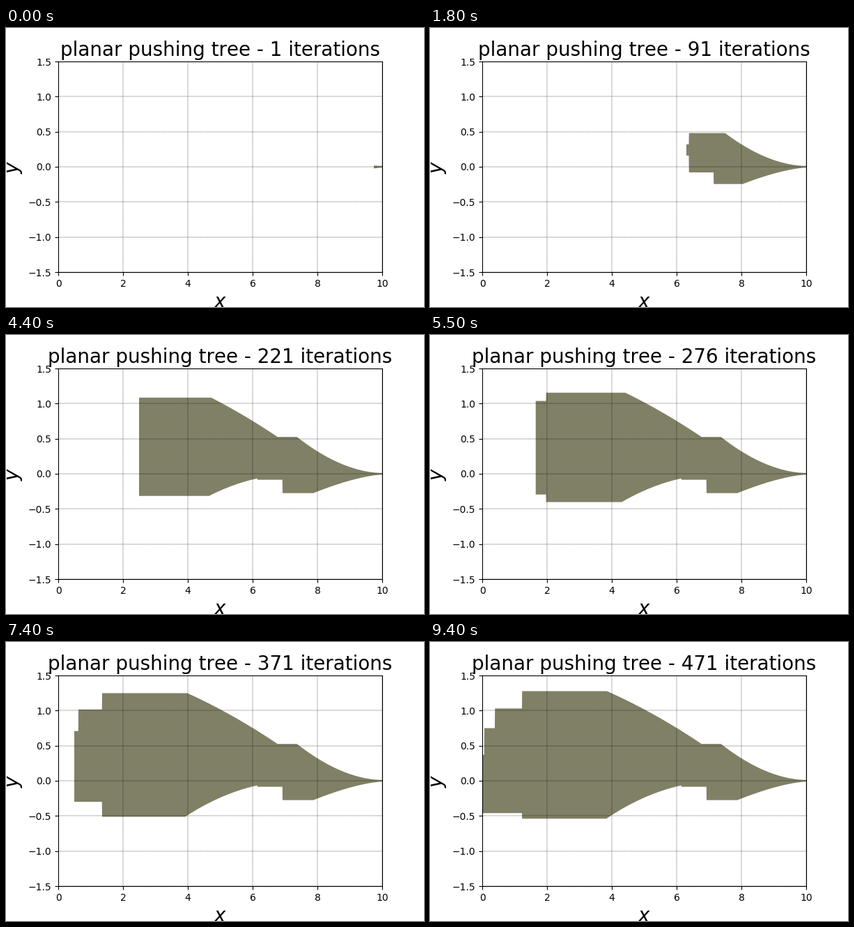
Recreate the animation shown at these times as a matplotlib script. Size 600 by 400 pixels, loop 9500 ms.

```python
import numpy as np
import matplotlib.pyplot as plt
from matplotlib.animation import FuncAnimation
from matplotlib.patches import Polygon

FRAMES, INTERVAL, STEP = 95, 100, 5
XS = np.linspace(0, 10, 1861)

plt.rcParams["font.family"] = "DejaVu Sans"
plt.rcParams["mathtext.fontset"] = "dejavusans"
plt.rcParams["text.kerning_factor"] = 6

# Growing boxes: (iteration, left, bottom, top); each exists from its first key on.
CORE = [(1, 9.74, -.03, .03), (91, 6.38, -.08, .48), (166, 4.95, -.07, .59),
        (221, 2.49, -.315, 1.085), (331, 1.45, -.49, 1.225), (421, 1.23, -.54, 1.277)]
ARM = [(91, 6.3, .16, .32), (166, 4.58, -.07, .505), (221, 2.49, -.315, 1.07),
       (331, .81, -.275, 1.005), (421, .39, -.315, 1.03)]
LOBE = [(1, 9.74, -.03, 0), (91, 7.14, -.245, 0), (221, 6.92, -.275, 0)]
TIP = [(331, .81, -.275, .7), (421, .1, -.33, .72), (471, .06, -.46, .75)]
RIM = [(400, 0, -.33, .18), (471, 0, -.46, .37)]


def reach(x):
    """Lower and upper limits of everything the tree can cover."""
    u = 10 - x
    v = np.maximum(6.77 - x, 0)
    w = np.maximum(6.15 - x, 0)
    cone = np.minimum(.012 + .085 * u**1.86, .525)
    high = np.where(v > 0, .525 + .31 * v - .018 * v**2, cone)
    keel = np.minimum(.012 + .085 * u**1.5, .275)
    low = np.where(x > 6.92, keel, np.where(w > 0, .065 + .1 * w + .045 * w**2, .085))
    return -low, high


LOW, HIGH = reach(XS)


def outline(count):
    """Union of the live boxes, cut to the reachable limits."""
    low = np.full_like(XS, np.inf)
    high = -low
    for keys in (CORE, ARM, LOBE, TIP, RIM):
        if count < keys[0][0]:
            continue
        when, *tracks = np.transpose(keys)
        left, bottom, top = (np.interp(count, when, track) for track in tracks)
        inside = XS >= left - 1e-9
        low[inside] = np.minimum(low, np.maximum(bottom, LOW))[inside]
        high[inside] = np.maximum(high, np.minimum(top, HIGH))[inside]
    used = high > low
    x, low, high = XS[used], low[used], high[used]
    return np.column_stack([np.r_[x, x[::-1]], np.r_[high, low[::-1]]])


fig = plt.figure(figsize=(6, 4), dpi=100)
ax = fig.add_axes([.125, .125, .775, .755])
ax.set(xlim=(0, 10), ylim=(-1.5, 1.5))
ax.grid(color="black", linestyle="--", linewidth=.3)
ax.set_xlabel("$x$", fontsize=20)
ax.set_ylabel("$y$", fontsize=20)
title = ax.set_title("", fontsize=20)
region = ax.add_patch(Polygon(outline(1), facecolor="#808066", edgecolor="none", zorder=1))


def update(i):
    count = 1 + STEP * i
    title.set_text(f"planar pushing tree - {count} iterations")
    region.set_xy(outline(count))
    return region, title


anim = FuncAnimation(fig, update, frames=FRAMES, interval=INTERVAL,
                     init_func=lambda: update(0), repeat=True, repeat_delay=0)
plt.show()
```
